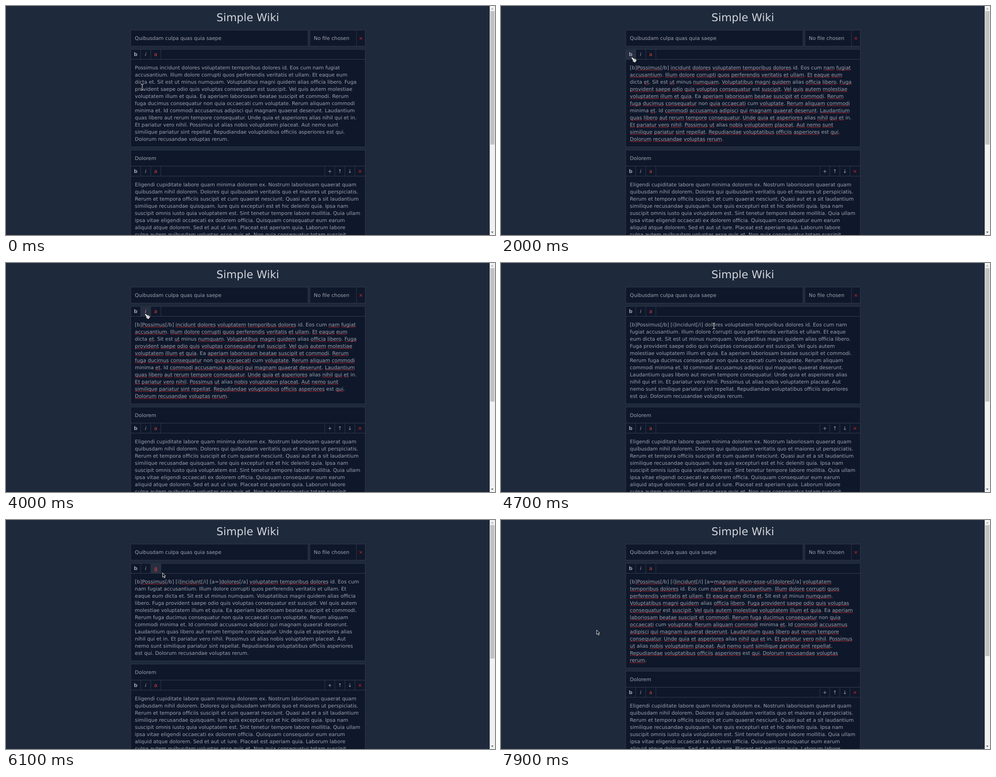
Write an HTML page that moves like this. It is 1091 px wide and 513 px high and loops after 8000 ms.

```html
<!DOCTYPE html>
<html lang="en">
<head>
<meta charset="utf-8">
<title>Simple Wiki</title>
<style>
  html, body { margin: 0; width: 100%; height: 100%; overflow: hidden; background: #1e293b; }
  svg { display: block; }
  text { font: 11.2px "DejaVu Sans", sans-serif; fill: #9ca3af; white-space: pre; text-rendering: geometricPrecision; }
  .title { font-size: 24px; fill: #d1d5db; text-anchor: middle; }
  .btn { text-anchor: middle; }
  .b { font-weight: bold; }
  .i { font-style: italic; }
  .a { fill: #df4538; }
  .x { fill: #dc2626; }
  .wave { fill: none; stroke: #dc2626; stroke-width: .85; }
</style>
</head>
<body>
<svg id="stage" width="1091" height="513" viewBox="0 0 1091 513"></svg>
<script>
const LOOP = 8000, STEP = 100;
const LEFT = 277.8, RIGHT = 802, TEXT_X = 287.6, CELL = 22.4, LINE = 16;
const EDGE = '#374151', FIELD = '#0f172a';
const stage = document.getElementById('stage');

function add(parent, tag, attrs = {}, content) {
  const el = document.createElementNS('http://www.w3.org/2000/svg', tag);
  for (const k in attrs) el.setAttribute(k, attrs[k]);
  if (content !== undefined) el.textContent = content;
  parent.appendChild(el);
  return el;
}
const group = parent => add(parent, 'g');
const rect = (parent, x, y, width, height, fill) => add(parent, 'rect', { x, y, width, height, fill });
const write = (parent, x, y, str, cls = '') => add(parent, 'text', { x, y, class: cls }, str);
const show = (el, on) => el.setAttribute('display', on ? 'inline' : 'none');

function box(parent, x, y, right, h) {
  return [rect(parent, x, y, right - x, h, EDGE),
          rect(parent, x + .8, y + .8, right - x - 1.6, h - 1.6, FIELD)];
}

// Formatting bar; returns its three hover backgrounds and the link label
function toolbar(parent, y, extras) {
  box(parent, LEFT, y, RIGHT, 23.2);
  const hovers = [], base = y + 15.6;
  let link;
  ['b', 'i', 'a'].forEach((c, k) => {
    const x = LEFT + k * CELL;
    hovers.push(rect(parent, x + .8, y + .8, 21.6, 21.6, '#272f40'));
    show(hovers[k], false);
    rect(parent, x + CELL, y, .8, 23, EDGE);
    link = write(parent, x + 11.4, base, c, 'btn ' + c);
  });
  [...extras].forEach((c, k) => {
    const x = RIGHT - .8 - CELL * (extras.length - k);
    rect(parent, x - .8, y, .8, 23, EDGE);
    write(parent, x + 10.9, base, c, 'btn ' + (c === '×' ? 'x' : ''));
  });
  return { hovers, link };
}

// Page head
write(stage, 539.5, 34, 'Simple Wiki', 'title');
box(stage, LEFT, 53.6, 674.2, 36.8);
write(stage, TEXT_X, 76, 'Quibusdam culpa quas quia saepe');
box(stage, 677.6, 53.6, RIGHT, 36.8);
rect(stage, 781.6, 54, .8, 36, EDGE);
write(stage, 686.8, 76, 'No file chosen');
write(stage, 791.6, 76, '×', 'btn x');

// First editor
const bar = toolbar(stage, 96.8, '');
const area = box(stage, LEFT, 119.2, RIGHT, 196.8);
const picks = group(stage);

const plain = `Possimus incidunt dolores voluptatem temporibus dolores id. Eos cum nam fugiat
accusantium. Illum dolore corrupti quos perferendis veritatis et ullam. Et eaque eum
dicta et. Sit est ut minus numquam. Voluptatibus magni quidem alias officia libero. Fuga
provident saepe odio quis voluptas consequatur est suscipit. Vel quis autem molestiae
voluptatem illum et quia. Ea aperiam laboriosam beatae suscipit et commodi. Rerum
fuga ducimus consequatur non quia occaecati cum voluptate. Rerum aliquam commodi
minima et. Id commodi accusamus adipisci qui magnam quaerat deserunt. Laudantium
quas libero aut rerum tempore consequatur. Unde quia et asperiores alias nihil qui et in.
Et pariatur vero nihil. Possimus ut alias nobis voluptatem placeat. Aut nemo sunt
similique pariatur sint repellat. Repudiandae voluptatibus officiis asperiores est qui.
Dolorum recusandae voluptas rerum.`;
const bold = plain.replace('Possimus', '[b]Possimus[/b]');
const tail = `molestiae voluptatem illum et quia. Ea aperiam laboriosam beatae suscipit et commodi.
Rerum fuga ducimus consequatur non quia occaecati cum voluptate. Rerum aliquam
commodi minima et. Id commodi accusamus adipisci qui magnam quaerat deserunt.
Laudantium quas libero aut rerum tempore consequatur. Unde quia et asperiores alias
nihil qui et in. Et pariatur vero nihil. Possimus ut alias nobis voluptatem placeat. Aut
nemo sunt similique pariatur sint repellat. Repudiandae voluptatibus officiis asperiores
est qui. Dolorum recusandae voluptas rerum.`;
const italic = `[b]Possimus[/b] [i]incidunt[/i] dolores voluptatem temporibus dolores id. Eos cum nam
fugiat accusantium. Illum dolore corrupti quos perferendis veritatis et ullam. Et eaque
eum dicta et. Sit est ut minus numquam. Voluptatibus magni quidem alias officia libero.
Fuga provident saepe odio quis voluptas consequatur est suscipit. Vel quis autem
` + tail;
const linked = `[b]Possimus[/b] [i]incidunt[/i] [a=]dolores[/a] voluptatem temporibus dolores id. Eos cum
nam fugiat accusantium. Illum dolore corrupti quos perferendis veritatis et ullam. Et
eaque eum dicta et. Sit est ut minus numquam. Voluptatibus magni quidem alias officia
libero. Fuga provident saepe odio quis voluptas consequatur est suscipit. Vel quis autem
` + tail;
const pasted = `[b]Possimus[/b] [i]incidunt[/i] [a=magnam-ullam-esse-ut]dolores[/a] voluptatem
temporibus dolores id. Eos cum nam fugiat accusantium. Illum dolore corrupti quos
perferendis veritatis et ullam. Et eaque eum dicta et. Sit est ut minus numquam.
Voluptatibus magni quidem alias officia libero. Fuga provident saepe odio quis voluptas
consequatur est suscipit. Vel quis autem molestiae voluptatem illum et quia. Ea aperiam
laboriosam beatae suscipit et commodi. Rerum fuga ducimus consequatur non quia
occaecati cum voluptate. Rerum aliquam commodi minima et. Id commodi accusamus
adipisci qui magnam quaerat deserunt. Laudantium quas libero aut rerum tempore
consequatur. Unde quia et asperiores alias nihil qui et in. Et pariatur vero nihil. Possimus
ut alias nobis voluptatem placeat. Aut nemo sunt similique pariatur sint repellat.
Repudiandae voluptatibus officiis asperiores est qui. Dolorum recusandae voluptas
rerum.`;

const known = new Set('a b i id eos cum dicta sit est minus alias ea non minima in'.split(' '));

// Zigzag lines under the words the spell checker does not know
function waves(parent, text, y) {
  for (const m of text.textContent.matchAll(/[A-Za-z]+/g)) {
    if (known.has(m[0].toLowerCase())) continue;
    const from = text.getStartPositionOfChar(m.index).x;
    const to = text.getEndPositionOfChar(m.index + m[0].length - 1).x;
    let d = `M${from} ${y + 2.1}`;
    for (let x = from + 1.6, k = 0; x <= to + .4; x += 1.6, k++) d += `L${x} ${y + (k % 2 ? 2.1 : 1.1)}`;
    add(parent, 'path', { d, class: 'wave' });
  }
}

const drafts = [plain, bold, italic, linked, pasted].map(str => {
  const root = group(stage), first = group(root), rest = group(root);
  str.split('\n').forEach((line, k) => {
    const y = 142 + k * LINE;
    waves(k ? rest : first, write(root, TEXT_X, y, line), y);
  });
  return { root, first, rest };
});
const caret = rect(stage, 0, 131.8, .9, 13.4, '#c3c8d0');

// Second editor
const lower = group(stage);
box(lower, LEFT, 322.4, RIGHT, 36.8);
write(lower, TEXT_X, 344.8, 'Dolorem');
toolbar(lower, 358.4, '+↑↓×');
box(lower, LEFT, 380.8, RIGHT, 196.8);
`Eligendi cupiditate labore quam minima dolorem ex. Nostrum laboriosam quaerat quam
quibusdam nihil dolorem. Dolores qui quibusdam veritatis quo et maiores ut perspiciatis.
Rerum et tempora officiis suscipit et cum quaerat nesciunt. Quasi aut et a sit laudantium
similique recusandae quisquam. Iure quis excepturi est et hic deleniti quia. Ipsa nam
suscipit omnis iusto quia voluptatem est. Sint tenetur tempore labore mollitia. Quia ullam
ipsa vitae eligendi occaecati ex dolorem officia. Quisquam consequatur eum earum
aliquid atque dolorem. Sed et aut ut iure. Placeat est aperiam quia. Laborum labore
culpa autem quibusdam voluptas esse quis et. Non quia consequatur totam suscipit`
  .split('\n').forEach((line, k) => write(lower, TEXT_X, 403.6 + k * LINE, line));

// Scrollbar
rect(stage, 1079.2, 0, 11.8, 513, '#f1f1f1');
const thumb = rect(stage, 1080.6, 11.4, 9.2, 299, '#c1c1c1');
add(stage, 'path', { d: 'M1082.2 7.4L1085 4.4L1087.8 7.4Z', fill: '#a3a3a3' });
add(stage, 'path', { d: 'M1082.2 505.4L1085 508.4L1087.8 505.4Z', fill: '#505050' });

// Mouse pointers
const beam = group(stage), hand = group(stage), arrow = group(stage);
const beamPath = 'M-3-6.3H-1L0-5.6L1-6.3H3M0-5.6V5.6M-3 6.3H-1L0 5.6L1 6.3H3';
add(beam, 'path', { d: beamPath, fill: 'none', stroke: '#111', 'stroke-width': 2.6 });
add(beam, 'path', { d: beamPath, fill: 'none', stroke: '#fff', 'stroke-width': 1 });
add(hand, 'path', { d: 'M0 1.2L1.8 0L6 3.6L9 3.4L12.4 7L8.4 12.4L3.6 9.8L3.2 6.2Z', fill: '#fff', stroke: '#111', 'stroke-width': .8 });
add(hand, 'path', { d: 'M4.4 6.6L7.6 9.6M6.2 5.4L9.2 8.2M8 4.6L10.6 7', fill: 'none', stroke: '#222', 'stroke-width': .7 });
add(arrow, 'path', { d: 'M.4.4V10.2L2.6 8.2L4.4 12L6 11.2L4.4 7.6H7.2Z', fill: '#111', stroke: '#fff', 'stroke-width': .9 });

// Pointer path: time, x, y
const path = [
  [0, 304, 182], [100, 305, 176], [200, 305, 176], [300, 306, 152], [400, 307, 135], [600, 307, 135],
  [700, 307, 137], [1200, 307, 137], [1500, 290.5, 117], [1600, 290.5, 114.5], [2000, 290.5, 114.5],
  [2100, 312, 122], [2300, 375, 138], [2500, 400, 140], [3300, 400, 140], [3400, 290.5, 114],
  [3500, 290.5, 114], [3900, 309.5, 113.5], [4200, 309.5, 113.5], [4300, 330, 122], [4500, 430, 150],
  [4600, 465, 152], [4700, 475, 141], [4800, 475, 139], [5100, 475, 139], [5500, 335, 114],
  [5600, 331, 113.5], [5800, 331, 113.5], [5900, 349, 118], [6100, 349, 118], [6400, 474, 145],
  [6800, 474, 145], [7100, 474, 166], [7500, 474, 166], [7900, 213, 246]
];
// Start, draft, spelling: 0 none, 1 first line, 2 all
const edits = [[0, 0, 0], [700, 0, 2], [1800, 1, 0], [2000, 1, 2], [4100, 2, 0], [5800, 3, 0], [6100, 3, 1], [7300, 4, 2]];
// Start, end, button
const hoverTimes = [[1500, 2100, 0], [3400, 3700, 0], [3700, 4300, 1], [5500, 6200, 2]];
// Start, end, x, width
const pickTimes = [[1000, 1700, 287.6, 52.2], [3300, 4000, 378.9, 45.2], [5100, 5800, 455.1, 41.3]];
const caretTimes = [[6700, 7300, 475.2], [7300, 7700, 605.4]];

const pickRects = pickTimes.map(([, , x, w]) => rect(picks, x, 131.8, w, 13.4, '#3367d1'));
const within = (t, [from, to]) => t >= from && t < to;

function pointAt(t) {
  const k = path.findIndex(p => p[0] > t);
  if (k < 0) return path[path.length - 1].slice(1);
  const [t0, x0, y0] = path[k - 1], [t1, x1, y1] = path[k];
  const u = (t - t0) / (t1 - t0);
  return [x0 + (x1 - x0) * u, y0 + (y1 - y0) * u];
}

function draw(t) {
  const [, draft, spelling] = edits.filter(e => e[0] <= t).pop();
  drafts.forEach((d, k) => {
    show(d.root, k === draft);
    show(d.first, spelling > 0);
    show(d.rest, spelling > 1);
  });

  const grow = draft === 4 ? LINE : 0;
  area[0].setAttribute('height', 196.8 + grow);
  area[1].setAttribute('height', 195.2 + grow);
  lower.setAttribute('transform', `translate(0 ${grow})`);
  thumb.setAttribute('height', grow ? 293.4 : 299);

  const over = hoverTimes.find(h => within(t, h));
  bar.hovers.forEach((h, k) => show(h, !!over && over[2] === k));
  bar.link.style.textDecoration = over && over[2] === 2 ? 'underline' : 'none';
  pickRects.forEach((r, k) => show(r, within(t, pickTimes[k])));
  const blink = caretTimes.find(c => within(t, c));
  show(caret, !!blink);
  if (blink) caret.setAttribute('x', blink[2]);

  const [x, y] = pointAt(t);
  const kind = y > 119.2 && x > LEFT ? beam : y < 119.2 && x < 345 ? hand : arrow;
  for (const p of [beam, hand, arrow]) show(p, p === kind);
  kind.setAttribute('transform', `translate(${x} ${y})`);
}

const start = performance.now();
function tick() {
  const t = (performance.now() - start) % LOOP;
  draw(Math.floor(t / STEP) * STEP);
  requestAnimationFrame(tick);
}
tick();
</script>
</body>
</html>
```
